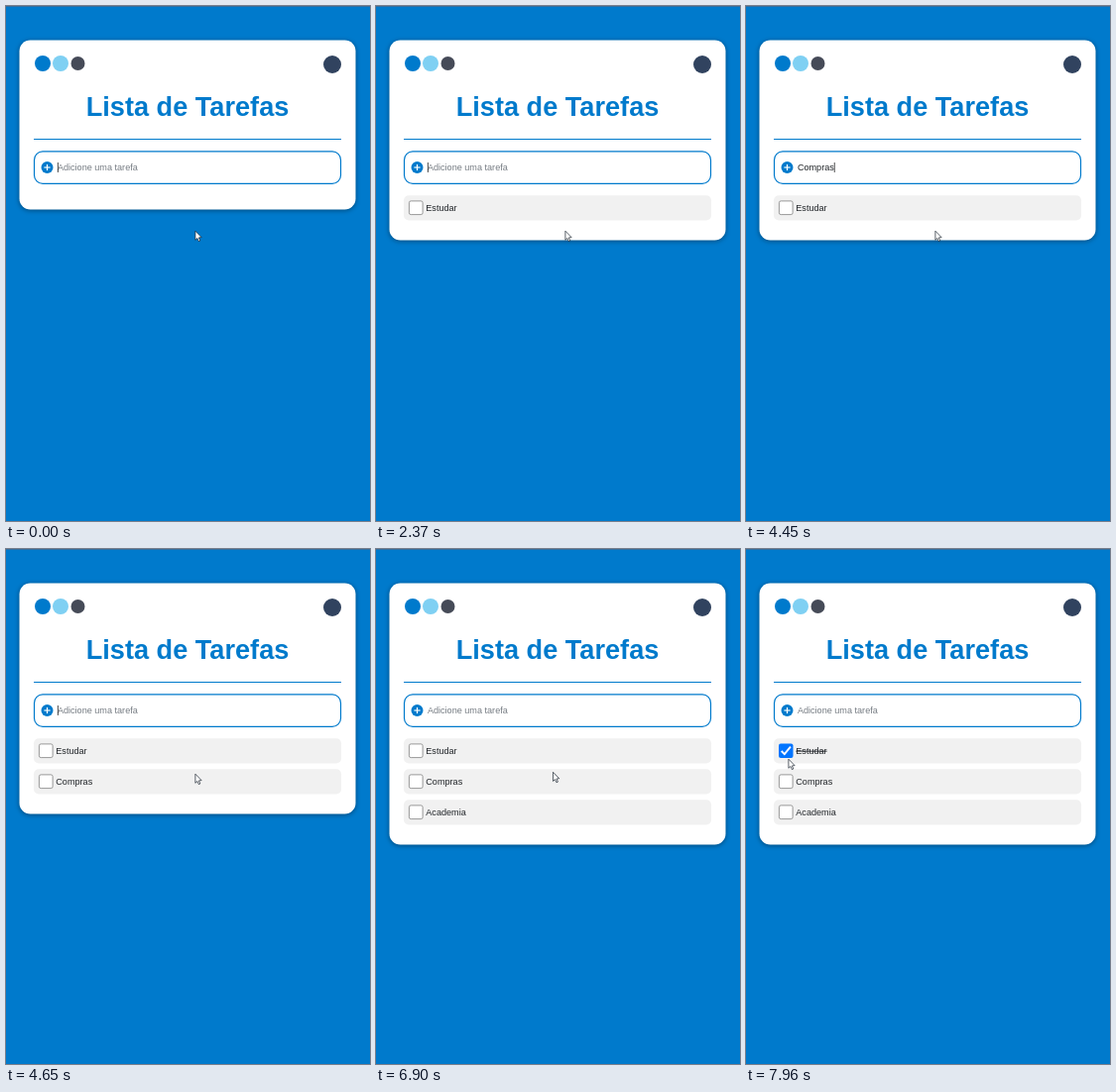
An HTML page with a canvas that plays this animation: 367x520 px, repeating every 7990 ms.

```html
<!DOCTYPE html>
<html lang="pt-BR">
<head>
<meta charset="utf-8">
<title>Lista de Tarefas</title>
<style>
  html, body { margin: 0; width: 100%; height: 100%; overflow: hidden; background: #007acc; }
  canvas { display: block; width: 367px; height: 520px; }
</style>
</head>
<body>
<canvas id="stage"></canvas>
<script>
const W = 367, H = 520, LOOP = 7990;
const BLUE = '#007acc', INK = '#202428';
const FONT = '"Liberation Sans", Arial, sans-serif';
const BLINK = 523, CHECK_TIME = 7740;
const TEXT_X = 51.9, ROW_STEP = 31;
const canvas = document.getElementById('stage');
const ctx = canvas.getContext('2d');
const ratio = window.devicePixelRatio || 1;
canvas.width = W * ratio;
canvas.height = H * ratio;

// Letters appear evenly from first to last; Enter adds the task.
const tasks = [
  { text: 'Estudar', first: 1020, last: 2070, enter: 2370 },
  { text: 'Compras', first: 3440, last: 4360, enter: 4650 },
  { text: 'Academia', first: 5150, last: 6020, enter: 6240 }
];

const rest = { x: 190.5, y: 227 }, tick = { x: 40, y: 204 }, end = { x: 42.5, y: 212 };

const clamp = (v, lo, hi) => Math.min(hi, Math.max(lo, v));

function ease(t, from, to) {
  const k = clamp((t - from) / (to - from), 0, 1);
  return k * k * (3 - 2 * k);
}

const mix = (a, b, k) => ({ x: a.x + (b.x - a.x) * k, y: a.y + (b.y - a.y) * k });

const pointerAt = t =>
  mix(mix(rest, tick, ease(t, 6760, 7560)), end, ease(t, 7780, 7960));

function typedAt(task, t) {
  if (!task || t < task.first) return '';
  const gap = (task.last - task.first) / (task.text.length - 1);
  return task.text.slice(0, 1 + Math.floor((t - task.first) / gap));
}

// The blink restarts with every key press.
function caretOn(t) {
  let lastKey = -225;
  for (const k of tasks) if (t >= k.first) lastKey = Math.min(t, k.last);
  return Math.floor((t - lastKey) / BLINK) % 2 === 0;
}

function box(x, y, w, h, r, fill, stroke, line = 1) {
  ctx.beginPath();
  ctx.roundRect(x, y, w, h, r);
  if (fill) { ctx.fillStyle = fill; ctx.fill(); }
  if (stroke) { ctx.strokeStyle = stroke; ctx.lineWidth = line; ctx.stroke(); }
}

function dot(x, y, r, color) {
  ctx.beginPath();
  ctx.arc(x, y, r, 0, Math.PI * 2);
  ctx.fillStyle = color;
  ctx.fill();
}

function rect(x, y, w, h, color) {
  ctx.fillStyle = color;
  ctx.fillRect(x, y, w, h);
}

function label(text, x, y, color) {
  ctx.font = '9.1px ' + FONT;
  ctx.fillStyle = color;
  ctx.fillText(text, x, y);
}

function drawCard(count) {
  ctx.save();
  ctx.shadowColor = 'rgba(0,0,0,.4)';
  ctx.shadowBlur = 5 * ratio;
  ctx.shadowOffsetY = ratio;
  box(13.5, 34.5, 339, 171 + count * ROW_STEP, 11, '#fff');
  ctx.restore();

  dot(37, 58, 8, BLUE);
  dot(55, 58, 8, '#7fd0f3');
  dot(72.5, 58, 7, '#464b58');
  dot(329, 59, 9, '#31435f');

  ctx.textAlign = 'center';
  ctx.font = 'bold 27.15px ' + FONT;
  ctx.fillStyle = BLUE;
  ctx.fillText('Lista de Tarefas', 183, 110.5);
  ctx.textAlign = 'left';
  rect(28, 134, 310, 1, BLUE);
}

function drawInput(t) {
  box(28.5, 146.9, 309, 32.5, 8.5, '#fff', BLUE, 1.2);
  dot(41.5, 163, 6, BLUE);
  rect(38.4, 162.4, 6.2, 1.2, '#fff');
  rect(40.9, 159.9, 1.2, 6.2, '#fff');

  const typed = typedAt(tasks.find(k => t < k.enter), t);
  label(typed || 'Adicione uma tarefa', TEXT_X, 166, typed ? INK : '#757b82');
  if (caretOn(t)) {
    const shift = typed ? ctx.measureText(typed).width : 0;
    rect(TEXT_X + shift, 158, 0.8, 10, '#222');
  }
}

function drawTask(text, i, done) {
  const y = 191.3 + i * ROW_STEP;
  box(28, y, 310, 25.2, 5, '#f1f1f1');
  if (done) {
    box(33, y + 5.2, 14.5, 14.5, 2, '#0075ff');
    ctx.strokeStyle = '#fff';
    ctx.lineWidth = 1.9;
    ctx.translate(33, y + 5.2);
    ctx.stroke(new Path2D('M2.7 7.5 L5.8 10.6 L11.9 3.1'));
    ctx.translate(-33, -y - 5.2);
  } else {
    box(33.4, y + 5.6, 13.7, 13.7, 1.8, '#fff', '#808080', 0.8);
  }
  label(text, 50.3, y + 15.7, INK);
  if (done) rect(50.3, y + 12.4, ctx.measureText(text).width, 0.9, INK);
}

function drawPointer({ x, y }) {
  const arrow = new Path2D('M.4 .2 V9.3 L2.4 7.5 L3.8 10.6 L5.3 10 L3.9 6.9 L6.6 6.6 Z');
  ctx.save();
  ctx.translate(x, y);
  ctx.fillStyle = '#fff';
  ctx.fill(arrow);
  ctx.strokeStyle = '#16202c';
  ctx.lineWidth = 0.7;
  ctx.stroke(arrow);
  ctx.restore();
}

function draw(t) {
  ctx.setTransform(ratio, 0, 0, ratio, 0, 0);
  rect(0, 0, W, H, BLUE);
  rect(0, 0, W, 1, '#356f9f');

  const added = tasks.filter(k => t >= k.enter);
  drawCard(added.length);
  drawInput(t);
  added.forEach((k, i) => drawTask(k.text, i, i === 0 && t >= CHECK_TIME));
  drawPointer(pointerAt(t));
}

const start = performance.now();
function frame() {
  draw((performance.now() - start) % LOOP);
  requestAnimationFrame(frame);
}
frame();
</script>
</body>
</html>
```
